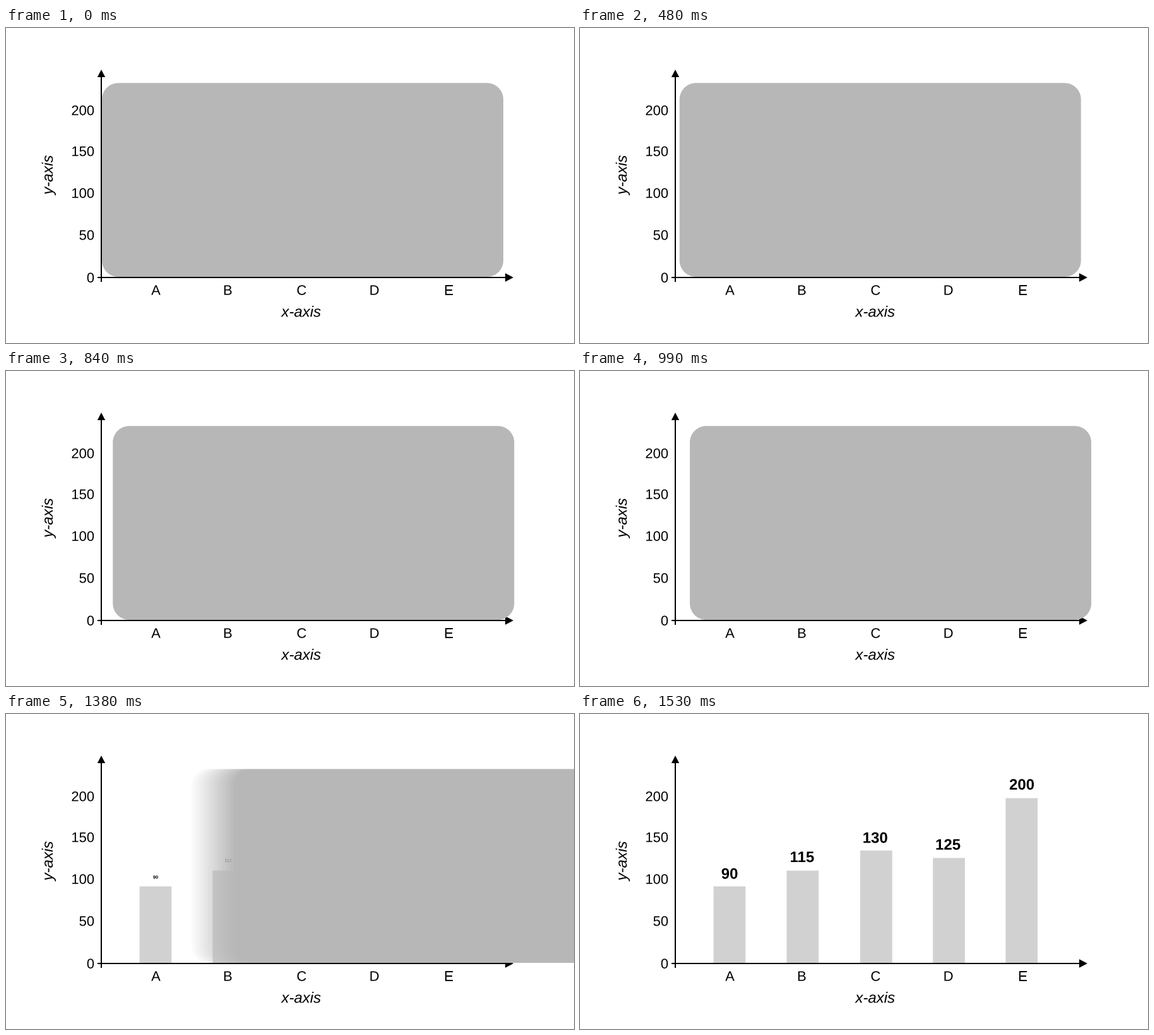
Animation, 900 px wide and 500 px high, one loop 2250 ms. Source, as a matplotlib script:

```python
import numpy as np
import matplotlib.pyplot as plt
from matplotlib.animation import FuncAnimation
from matplotlib.patches import PathPatch, Polygon, Rectangle
from matplotlib.textpath import TextPath
from matplotlib.transforms import Affine2D

W, H = 900, 500
STEP, FRAMES = 30, 75
BAR_COLOR = "#d1d1d2"
COVER_GRAY = 0xB7 / 255
COVER_W, COVER_TOP, COVER_BOTTOM, RADIUS = 636, 87.3, 395, 26
EXIT, POP_END = 1350, 1530
SHUTTER, SAMPLES = 15, 16

fig = plt.figure(figsize=(W / 100, H / 100), dpi=100, facecolor="white")
ax = fig.add_axes([0, 0, 1, 1])
ax.axis("off")


def shape(patch, z):
    patch.set(linewidth=0, zorder=z)
    patch.set_snap(False)
    ax.add_artist(patch)


def box(x0, y0, x1, y1, color="black", z=2):
    shape(Rectangle((x0, y0), x1 - x0, y1 - y0, color=color), z)


def place(patch, x, y, scale=1, angle=0):
    move = Affine2D().scale(scale, -scale).rotate_deg(angle).translate(x, y)
    patch.set_transform(move + ax.transData)


def text(s, x, y, size, align=0.5, angle=0, **font):
    """Outline text with its ink aligned on x and its baseline on y."""
    path = TextPath((0, 0), s, size=size, prop={"family": "Liberation Sans", **font})
    ink = path.get_extents()
    path = Affine2D().translate(-ink.x0 - align * ink.width, 0).transform_path(path)
    patch = PathPatch(path, facecolor="black", linewidth=0, zorder=2)
    place(patch, x, y, angle=angle)
    ax.add_artist(patch)
    return patch


# Cover panel: position over time and its antialiased mask
py, px = np.mgrid[0:H, 0:W] + 0.5


def cover_left(t):
    drift = 0.032 * (np.clip(t, 300, EXIT) - 300)
    return 152 + drift + 4.73 * max(t - EXIT, 0)


def cover_mask(left):
    mid = (COVER_TOP + COVER_BOTTOM) / 2
    dx = np.abs(px - left - COVER_W / 2) - COVER_W / 2 + RADIUS
    dy = np.abs(py - mid) - (COVER_BOTTOM - COVER_TOP) / 2 + RADIUS
    outside = np.hypot(np.maximum(dx, 0), np.maximum(dy, 0))
    dist = outside + np.minimum(np.maximum(dx, dy), 0) - RADIUS
    return np.clip(0.5 - dist, 0, 1)


def cover_alpha(t):
    if t < EXIT:
        return cover_mask(cover_left(t))
    if t >= POP_END:
        return np.zeros((H, W))
    times = t + SHUTTER * ((np.arange(SAMPLES) + 0.5) / SAMPLES - 0.5)
    return sum(cover_mask(cover_left(s)) for s in times) / SAMPLES


# Axes with arrowheads
box(150, 76, 152, 403)
box(145, 395, 793, 397)
shape(Polygon([(151, 66), (144.8, 78), (157.2, 78)], color="black"), 2)
shape(Polygon([(804, 396), (791, 389.2), (791, 402.8)], color="black"), 2)

for value, base in zip(range(0, 201, 50), (403.8, 336.2, 269.6, 203.2, 138.3)):
    text(str(value), 139.2, base, 22, align=1)
text("x-axis", 467, 458.3, 24, style="italic")
text("y-axis", 74, 234, 24, angle=-90, style="italic")

# Bars: name, name x, left edge, top edge, value, value x, value baseline
BARS = [
    ("A", 237.5, 211.6, 273.6, 90, 237, 261.5),
    ("B", 351.7, 327.4, 248.6, 115, 352.3, 235),
    ("C", 468.5, 444, 216.7, 130, 468, 204.5),
    ("D", 584, 559.2, 228.5, 125, 583.5, 215.3),
    ("E", 702.3, 674.4, 133.6, 200, 700, 120),
]
labels = []
for name, name_x, left, top, value, value_x, base in BARS:
    box(left, top, left + 50.7, 395, BAR_COLOR, 1)
    text(name, name_x, 423.6, 22)
    label = text(str(value), value_x, base, 24, weight="bold")
    labels.append((label, value_x, base))

pixels = np.full((H, W, 4), COVER_GRAY)
cover = ax.imshow(pixels, extent=(0, W, H, 0), aspect="auto",
                  interpolation="nearest", zorder=5)
ax.set(xlim=(0, W), ylim=(H, 0))


def draw(i):
    t = i * STEP
    pixels[..., 3] = cover_alpha(t)
    cover.set_data(pixels)
    pop = np.interp(t, [EXIT, 1470, POP_END], [0, 1.22, 1])
    for label, x, y in labels:
        label.set_visible(pop > 0)
        if pop > 0:
            place(label, x, y, pop)
    return [cover]


anim = FuncAnimation(fig, draw, frames=FRAMES, interval=STEP, repeat=True,
                     repeat_delay=0, blit=False)
plt.show()
```
